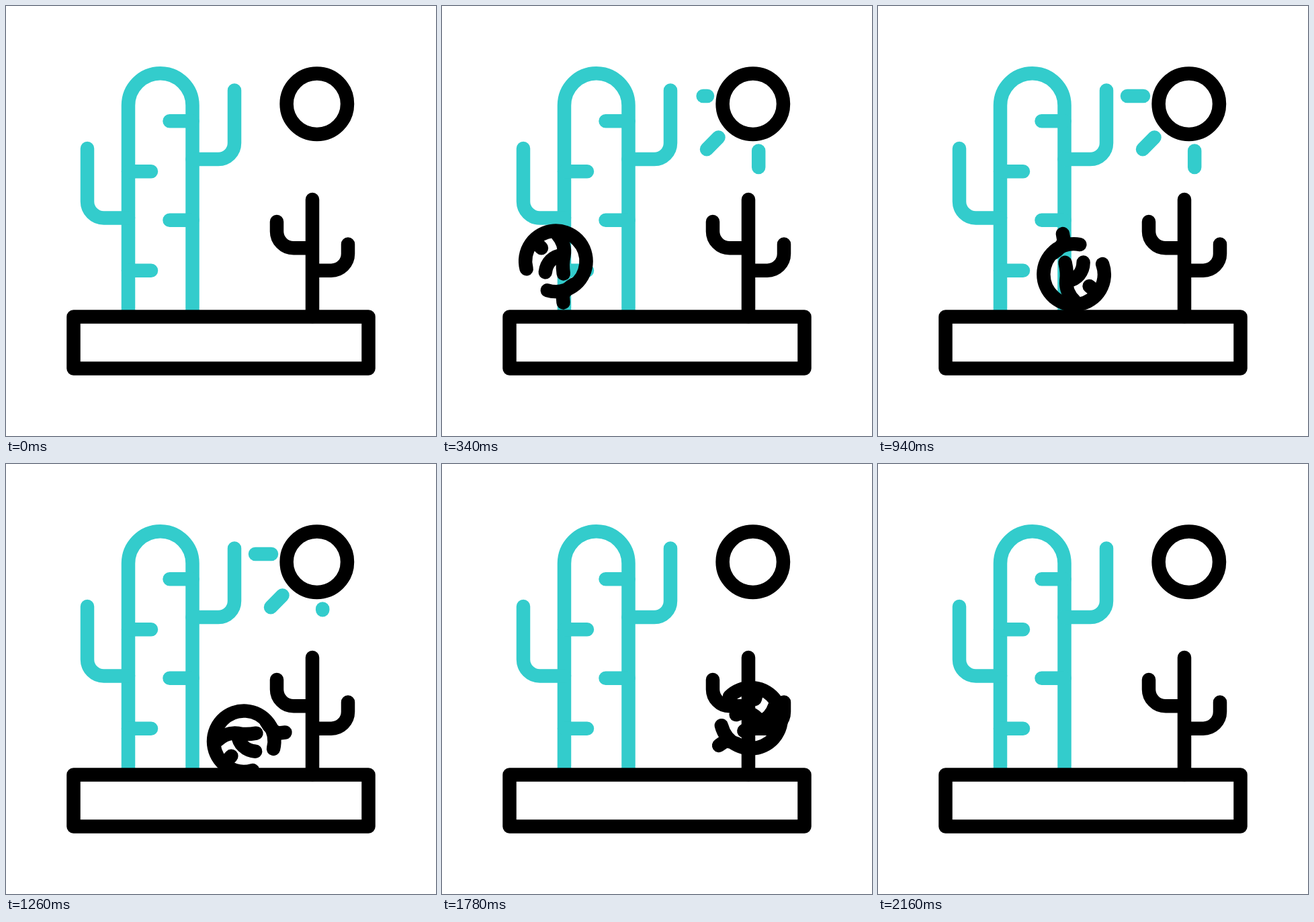
An HTML page that plays this animation: 640x640 px, repeating every 2.4 s.

```html
<!DOCTYPE html>
<html lang="en">
<head>
<meta charset="utf-8">
<title>Desert</title>
<style>
  html, body { margin: 0; width: 100%; height: 100%; overflow: hidden; background: #fff; }
  svg { display: block; width: 100vw; height: 100vh; }
  g { fill: none; stroke-width: 20.5; stroke-linecap: round; stroke-linejoin: round; }
  .teal { stroke: #3cc; }
  .black { stroke: #000; }
</style>
</head>
<body>
<svg viewBox="0 0 640 640">
  <g class="teal">
    <path stroke-linecap="butt" d="M182 458V148A47.75 47.75 0 0 1 277.5 148V458"/>
    <path d="M121 212V291A24.5 24.5 0 0 0 145.5 315.5H182M340 125.5V204A24 24 0 0 1 316 228H277.5"/>
    <path d="M243.5 171.3H277.5M182 246.3H216M243.5 318.8H277.5M182 393.7H216"/>
    <path class="ray"/><path class="ray"/><path class="ray"/>
  </g>
  <g class="black">
    <circle cx="462.8" cy="145.7" r="45.2"/>
    <path d="M456 288V462M403 321V335A25 25 0 0 0 428 360.3H456M509 354.5V368.5A25 25 0 0 1 484 393.7H456"/>
    <rect x="100.5" y="462.5" width="439" height="77"/>
    <g id="weed">
      <path d="M-43.7 11.6A45.2 45.2 0 1 1 -12.4 43.4"/>
      <path d="M2 -40C10 -31 14 -20 12 -8C10 0 10 8 11.5 18.5M10 -9C-4 -8 -14 2 -15.5 16.5"/>
      <path d="M-21.5 -19.5L-31 -29M11.5 61.5L10.8 53C11 46 20 38 28 34"/>
    </g>
  </g>
</svg>
<script>
const LOOP = 2400, STEP = 20, RAY_TIME = 150, RAY_OUT = 1120;
const weed = document.getElementById('weed');
const rayPaths = document.querySelectorAll('.ray');

// Each ray: start beside the sun, then its full extent.
const rays = [
  [471.2, 215.5, 0, 24.5],
  [411.5, 195.5, -17.5, 17.7],
  [395, 134, -24, 0]
];
// Turning points of the bouncing path.
const bounce = [[78, 414.8], [212, 369.5], [344, 414.8], [418, 369.5], [562, 414.8]];

const clamp = v => Math.min(1, Math.max(0, v));

function heightAt(x) {
  let i = 1;
  while (i < bounce.length - 1 && x > bounce[i][0]) i++;
  const [x0, y0] = bounce[i - 1], [x1, y1] = bounce[i];
  const ease = (1 - Math.cos(Math.PI * clamp((x - x0) / (x1 - x0)))) / 2;
  return y0 + (y1 - y0) * ease;
}

function drawWeed(t) {
  const u = t - 1080;
  const x = 319 + u * (0.196 + 0.026 * (u / 1060) ** 4);
  const angle = 216 + 0.2915 * u;
  weed.setAttribute('transform', `translate(${x} ${heightAt(x)}) rotate(${angle})`);
  weed.style.display = t >= STEP && t < 2160 ? '' : 'none';
}

function drawRays(t) {
  rays.forEach(([x, y, dx, dy], i) => {
    const grown = clamp((t - i * RAY_TIME) / RAY_TIME);
    const gone = clamp((t - RAY_OUT - i * RAY_TIME) / RAY_TIME);
    const size = grown - gone;
    rayPaths[i].setAttribute('d', `M${x} ${y}l${dx * size} ${dy * size}`);
    rayPaths[i].style.display = size > 0 ? '' : 'none';
  });
}

function render(now) {
  const t = Math.floor((now % LOOP) / STEP) * STEP;
  drawWeed(t);
  drawRays(t);
}

const start = performance.now();
function tick() {
  render(performance.now() - start);
  requestAnimationFrame(tick);
}
tick();
</script>
</body>
</html>
```
